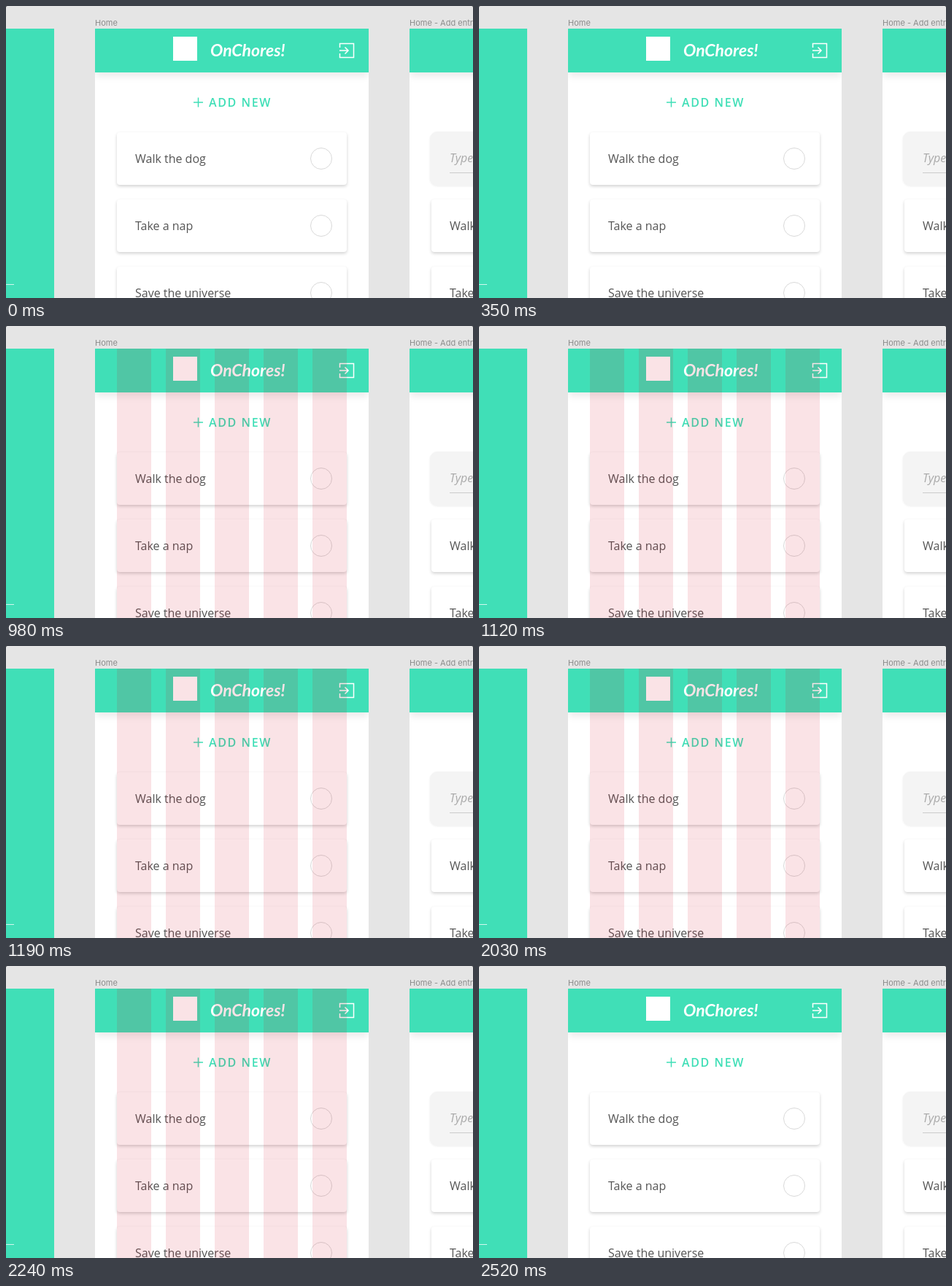
These frames come from a looping animation (640 by 400 pixels, 2660 ms). An HTML page:

```html
<!DOCTYPE html>
<html lang="en">
<head>
<meta charset="utf-8">
<title>Layout grid toggle</title>
<style>
  html, body { margin: 0; width: 100%; height: 100%; overflow: hidden; background: #333; }
  #stage { position: absolute; left: 0; top: 0; width: 640px; height: 400px; overflow: hidden;
    background: #e5e5e5; border-radius: 2px 2px 0 0; font: 16px "Open Sans", sans-serif; color: #555; }
  #stage * { position: absolute; box-sizing: border-box; }
  .board { top: 31px; height: 369px; overflow: hidden; background: #fff; }
  .green, .header { background: #40dfb7; }
  .header { left: 0; top: 0; width: 100%; height: 60px; box-shadow: 0 7px 9px -1px rgba(0, 0, 0, .08); }
  .card { width: 315px; height: 72px; border-radius: 4px; background: #fff;
    box-shadow: 0 2px 4px rgba(0, 0, 0, .18); }
  .card.entry { width: 320px; height: 74px; border-radius: 10px; background: #f4f4f4;
    box-shadow: 0 1px 3px rgba(0, 0, 0, .07); }
  .circle { left: 265px; top: 21px; width: 30px; height: 30px; border: 1px solid #d9d9d9; border-radius: 50%; }
  .text { white-space: pre; line-height: 20px; }
  .label { font: 11px/14px Inter, sans-serif; color: #8b8b8b; top: 16px; }
  .add { font-weight: 600; letter-spacing: 1.6px; color: #40dfb7; }
  .brand { font: italic bold 23px/28px Lato, sans-serif; color: #fff; }
  .hint { font-style: italic; color: #aaa; }
  .column { top: 0; width: 47px; height: 369px; background: rgba(208, 2, 27, .11); }
  #grid { left: 0; top: 0; width: 100%; height: 100%; opacity: 0; }
  svg { left: 0; top: 0; fill: none; stroke-width: 1.5; }
</style>
</head>
<body>
<div id="stage"></div>
<script>
const LOOP = 2660, GRID_ON = 980, GRID_OFF = 2520;
const stage = document.getElementById('stage');

function box(parent, className, style = {}, text = '') {
  const el = document.createElement('div');
  el.className = className;
  el.textContent = text;
  for (const [key, value] of Object.entries(style))
    el.style[key] = typeof value === 'number' ? value + 'px' : value;
  parent.append(el);
  return el;
}

const label = (left, text) => box(stage, 'text label', { left }, text);
const board = left => box(stage, 'board', { left, width: 375 });

function card(parent, left, top, task) {
  const el = box(parent, 'card', { left, top });
  box(el, 'text', { left: 25, top: 26 }, task);
  box(el, 'circle');
}

// Neighbouring screen on the left
const login = box(stage, 'board green', { left: 0, width: 66 });
box(login, '', { left: 0, top: 350, width: 11, height: 1, background: 'rgba(255,255,255,.75)' });

// Home screen
label(122, 'Home');
const home = board(122);
box(home, 'header');
box(home, '', { left: 107, top: 11, width: 33, height: 33, background: '#fff' });
box(home, 'text brand', { left: 158, top: 15 }, 'OnChores!');
box(home, 'text add', { left: 156, top: 91 }, 'ADD NEW');
home.insertAdjacentHTML('beforeend', `
  <svg width="375" height="369">
    <path stroke="#fff" d="M335.5 26V20.5H354.5V39.5H335.5V34M335 30H347M342.5 25.5L347 30L342.5 34.5"/>
    <path stroke="#40dfb7" d="M135 101H148M141.5 94.5V107.5"/>
  </svg>`);
['Walk the dog', 'Take a nap', 'Save the universe']
  .forEach((task, i) => card(home, 30, 142 + 92 * i, task));

// Add entry screen
label(553, 'Home - Add entry');
const entry = board(553);
box(entry, 'header');
const field = box(entry, 'card entry', { left: 28, top: 141 });
box(field, 'text hint', { left: 27, top: 26 }, 'Type here');
box(field, '', { left: 27, top: 56, width: 265, height: 1, background: '#ccc' });
['Walk the dog', 'Take a nap'].forEach((task, i) => card(entry, 30, 234 + 92 * i, task));

// Column overlay switches on and off without fading
const grid = box(home, '');
grid.id = 'grid';
for (let i = 0; i < 5; i++) box(grid, 'column', { left: 30 + 67 * i });
const steps = [[0, 0], [GRID_ON, 1], [GRID_OFF, 0], [LOOP, 0]];
grid.animate(
  steps.map(([time, opacity]) => ({ offset: time / LOOP, opacity, easing: 'steps(1, end)' })),
  { duration: LOOP, iterations: Infinity });
</script>
</body>
</html>
```
